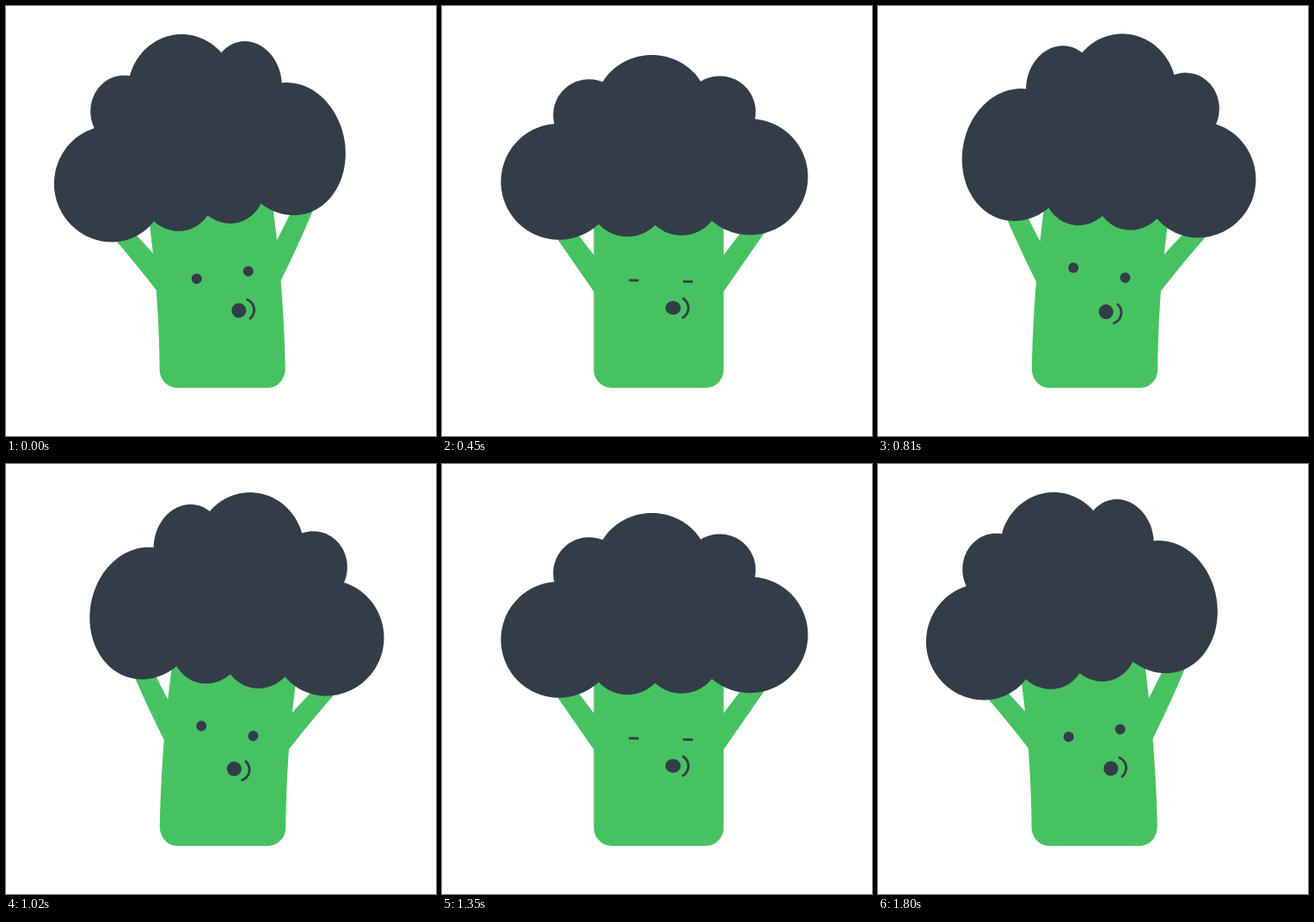
Animation, 500 px wide and 500 px high, one loop 1830 ms. Source, as an HTML page with a canvas:

```html
<!DOCTYPE html>
<html>
<head>
<meta charset="utf-8">
<style>
html, body { margin: 0; width: 100%; height: 100%; overflow: hidden; background: #fff; }
canvas { display: block; width: 500px; height: 500px; }
</style>
</head>
<body>
<canvas id="stage" width="500" height="500"></canvas>
<script>
const ctx = document.getElementById('stage').getContext('2d');
const DARK = '#333d48', GREEN = '#47c261';
const FLOOR = 444, CAP_X = 247, BODY_X = 252, BODY_HALF = 75.5, CORNER = 21;
const SIDES = [-1, 1];
let bend = 0, stretch = 0;

// Lean and stretch a resting point; the floor stays put.
function warp([x, y]) {
  const h = FLOOR - y, dx = x - CAP_X;
  return [
    x + 3.7e-4 * h * h * bend - (0.03 + 1e-4 * h) * stretch * dx,
    y - 0.059 * h * stretch + 6.5e-4 * h * dx * bend
  ];
}

function arc(cx, cy, rx, ry = rx, from = 0, to = 2 * Math.PI, steps = 90) {
  return Array.from({ length: steps + 1 }, (_, i) => {
    const a = from + (to - from) * i / steps;
    return [cx + rx * Math.cos(a), cy + ry * Math.sin(a)];
  });
}

// Fill a polygon, splitting its sides so that they can curve.
function fill(points, color) {
  ctx.fillStyle = color;
  ctx.beginPath();
  points.forEach(([x, y], i) => {
    const [nx, ny] = points[(i + 1) % points.length];
    const n = Math.ceil(Math.hypot(nx - x, ny - y) / 12) || 1;
    for (let k = 0; k < n; k++) {
      ctx.lineTo(...warp([x + (nx - x) * k / n, y + (ny - y) * k / n]));
    }
  });
  ctx.fill();
}

function corner(side, from) {
  const x = BODY_X + side * (BODY_HALF - CORNER);
  return arc(x, FLOOR - CORNER, CORNER, CORNER, from, from + Math.PI / 2, 12);
}

const body = [
  [BODY_X - BODY_HALF, 200], [BODY_X + BODY_HALF, 200],
  ...corner(1, 0), ...corner(-1, Math.PI / 2)
];

const arms = SIDES.map(side =>
  [[129, 255], [102, 255], [72, 294], [72, 337]].map(([dx, y]) => [BODY_X + side * dx, y]));

// A pair of round lobes, the right one slightly higher.
const lobePair = (dx, y, r) =>
  SIDES.map(side => arc(CAP_X + side * dx, y - side * dx * 0.025, r));

const cap = [
  arc(CAP_X, 185, 105, 45),
  arc(244, 118, 65.5, 61),
  ...lobePair(111, 201.5, 67.5),
  ...lobePair(76, 125, 41.7),
  ...lobePair(31.5, 222.5, 45)
];

function at(x, y, angle, draw) {
  ctx.save();
  ctx.translate(x, y);
  ctx.rotate(angle);
  ctx.beginPath();
  draw();
  ctx.restore();
}

function face(toExtreme) {
  const tilt = 0.024 + 0.17 * bend;
  const x = 254.5 + 2.8 * bend, y = 319.8 - 8.5 * stretch - 1.5 * bend;
  const half = 31.5 - 1.5 * stretch;
  ctx.fillStyle = ctx.strokeStyle = DARK;
  ctx.lineWidth = 2.8;

  for (const side of SIDES) {
    at(x + side * half, y + side * half * tilt, tilt, () => {
      if (toExtreme < 165) {
        ctx.arc(0, 0, 6, 0, 7);
        ctx.fill();
      } else {
        ctx.moveTo(-5.7, 0);
        ctx.lineTo(5.7, 0);
        ctx.stroke();
      }
    });
  }

  // The mouth drops while the eyes are open.
  const k = Math.min(1, Math.max(0, (210 - toExtreme) / 120));
  const drop = k * k * (3 - 2 * k);
  const mouthX = 268.7 - 2.8 * bend - 0.7 * drop;
  const mouthY = 351 - 3 * stretch + (6.8 + 0.7 * bend) * drop;
  at(mouthX, mouthY, tilt, () => {
    ctx.ellipse(0, 0, 9 - 0.5 * stretch, 8 + 0.5 * stretch, 0, 0, 7);
    ctx.fill();
    ctx.beginPath();
    ctx.lineCap = 'round';
    ctx.arc(4.8, 0, 13, -1.02, 1.02);
    ctx.stroke();
  });
}

function frame(now) {
  const t = Math.floor(now % 1830 / 30) * 30;
  const away = Math.abs(t % 900 - 450) / 450; // 0 upright, 1 fully leaning
  const side = t >= 450 && t < 1350 ? 1 : -1;
  stretch = 1 - (1 - away) ** 2;
  bend = side * (1 - (1 - away) ** 3.6);

  ctx.fillStyle = '#fff';
  ctx.fillRect(0, 0, 500, 500);
  [body, ...arms].forEach(shape => fill(shape, GREEN));
  cap.forEach(shape => fill(shape, DARK));
  face(450 * (1 - away));
  requestAnimationFrame(frame);
}
frame(0);
</script>
</body>
</html>
```
